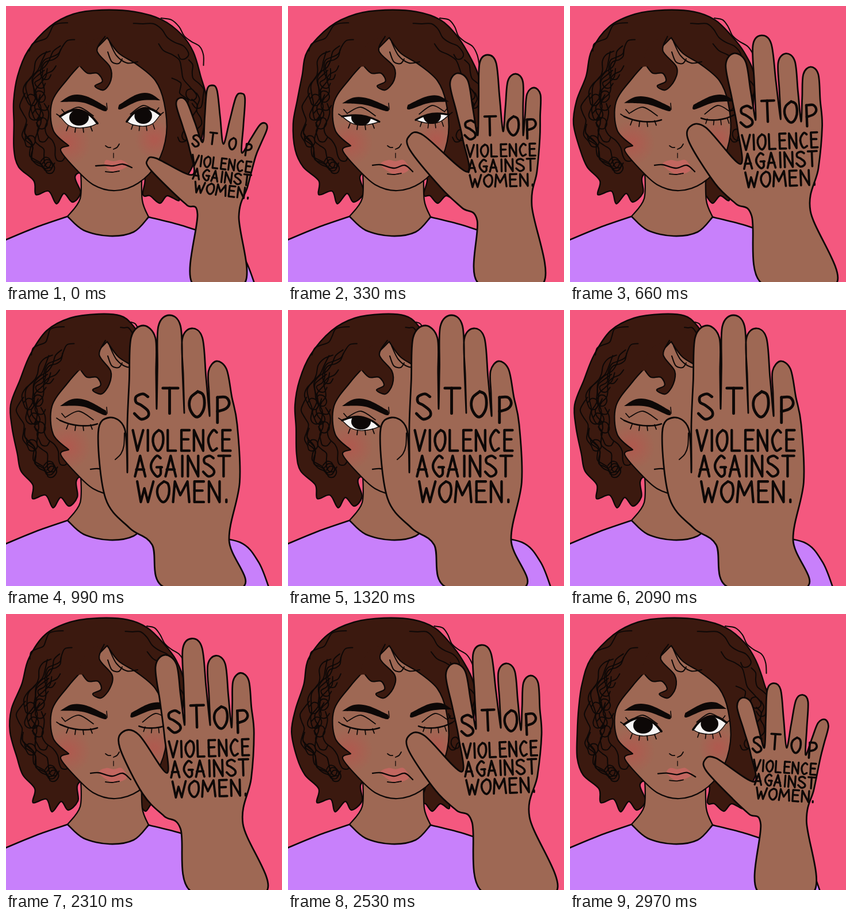
Recreate the animation shown at these times as an HTML page with a canvas. Size 480x480 px, loop 3.08 s.

```html
<!DOCTYPE html>
<html lang="en">
<head>
<meta charset="utf-8">
<title>Stop violence against women.</title>
<style>
  html, body { margin: 0; width: 100%; height: 100%; overflow: hidden; background: #f4587f; }
  canvas { display: block; width: 480px; height: 480px; }
</style>
</head>
<body>
<canvas id="stage" width="480" height="480" role="img" aria-label="STOP VIOLENCE AGAINST WOMEN."></canvas>
<script>
const ctx = document.getElementById('stage').getContext('2d');
const INK = '#0d0807', SKIN = '#9e6854', HAIR = '#3b190f', SHIRT = '#c880fb', PINK = '#f4587f';
const STEP = 110, COUNT = 28, TURN = 14;

const clamp = v => Math.max(0, Math.min(1, v));
const lerp = (a, b, u) => a + (b - a) * u;
const mix = (p, q, u) => p.map((v, i) => lerp(v, q[i], u));
const P = s => s.split(' ').map(v => v.split(',').map(Number));
const noise = n => { const v = Math.sin(n * 127.1) * 43758.5; return v - Math.floor(v); };

// Joints of the hand as it comes closer (near 0..1).
// arm: wrist and arm bottom, left then right; tips: thumb to little finger; base: finger roots.
const poses = [
  { at: 0, near: 0, arm: '333,362 324,482 405,366 415,482',
    tips: '246,268 302,160 358,138 409,152 451,204', base: '319,248 342,237 378,240 410,255 434,262' },
  { at: 3, near: .35, arm: '329,373 331,482 424,347 444,482',
    tips: '211,226 294,117 347,85 396,118 428,142', base: '304,232 330,225 374,218 409,225 438,229' },
  { at: 5, near: .5, arm: '320,362 337,482 420,353 467,482',
    tips: '211,211 288,86 336,54 379,86 422,107', base: '297,216 327,200 370,198 405,202 441,210' },
  { at: 9, near: 1, arm: '254,408 275,482 388,400 412,482',
    tips: '180,187 239,27 284,9 323,32 366,89', base: '211,199 262,172 310,179 354,184 402,199' }
];
const joints = ['arm', 'tips', 'base'];
poses.forEach(p => joints.forEach(k => p[k] = P(p[k])));

const hairLine = P('130,290 128,325 112,341 99,326 84,344 73,322 50,328 50,304 26,280 16,250 10,205 12,165 24,122 38,78 72,36 115,14 165,7 222,10 268,24 302,50 326,80 342,120 347,170 338,245 318,295 292,310 298,338 278,330 264,343 248,330 236,328 236,290');
const faceLine = P('109,243 82,216 80,167 108,126 136,95 176,55 196,82 228,102 260,130 275,168 279,222 263,273 230,308 190,321 152,311 119,281 95,251');
const bangLine = P('122,106 140,66 171,53 160,78 183,106 182,129 168,146 153,139 167,131 160,117 143,117 132,106');

// Pen strokes on a 0..9 grid, "~" marks a rounded stroke.
const glyphs = {
  S: '~815011134486884907', T: '0090 4049', O: '~501205285987948150', P: '1019 ~1060826415',
  V: '004990', I: '4049', L: '101989', E: '80101989 1474', N: '09008980', C: '~815013164988',
  A: '094089 1676', G: '~81501316598885 5595', W: '0029436990', M: '0910468099', '.': '4849'
};
const advance = { I: .3, '.': .3, W: 1.35, M: 1.35 };

function poseAt(j) {
  let i = 0;
  while (i < poses.length - 2 && poses[i + 1].at <= j) i++;
  const a = poses[i], b = poses[i + 1];
  const t = clamp((j - a.at) / (b.at - a.at));
  const u = i === poses.length - 2 ? t * t : t;
  const p = { j, near: lerp(a.near, b.near, u) };
  joints.forEach(k => p[k] = a[k].map((v, n) => mix(v, b[k][n], u)));
  p.open = Math.max(clamp((5 - j) / 3.8), clamp((j - 9) / 4));
  p.sneer = clamp(j / 3);
  p.size = 20 + 24 * p.near ** .6;
  p.bulge = 2 + 36 * p.near ** 2;
  return p;
}

// Smooth line through the points; indices in corners stay sharp.
function curve(p, closed = false, corners = []) {
  const n = p.length;
  const at = i => closed ? p[(i + n) % n] : p[Math.max(0, Math.min(n - 1, i))];
  ctx.beginPath();
  ctx.moveTo(...p[0]);
  for (let i = 0; i < n - (closed ? 0 : 1); i++) {
    const a = at(i), b = at(i + 1);
    const z = corners.includes(i) ? a : at(i - 1);
    const y = corners.includes((i + 1) % n) ? b : at(i + 2);
    ctx.bezierCurveTo(a[0] + (b[0] - z[0]) / 6, a[1] + (b[1] - z[1]) / 6,
      b[0] - (y[0] - a[0]) / 6, b[1] - (y[1] - a[1]) / 6, ...b);
  }
}
function fill(color) { ctx.fillStyle = color; ctx.fill(); }
function stroke(w = 2.3) { ctx.strokeStyle = INK; ctx.lineWidth = w; ctx.stroke(); }
function line(p, w) { curve(typeof p === 'string' ? P(p) : p); stroke(w); }

// Hair waves with time; its right half folds away behind the near hand.
function sway([x, y], p, amp) {
  const fold = 1 - .6 * p.near ** 2;
  return [(x > 190 ? 190 + (x - 190) * fold : x) + Math.sin(y * .04 + p.j * .5) * amp, y];
}

function strand(p, side, r, from, to, loop) {
  const pts = [];
  for (let i = 0; i <= 7; i++) {
    const a = lerp(from, to, i / 7), q = r + Math.sin(i * 1.5 + r) * 5;
    pts.push([188 + side * q * Math.sin(a), 184 - q * Math.cos(a)]);
  }
  const [x, y] = pts[7];
  for (let i = 1; i <= loop; i++) pts.push([x + side * (Math.cos(i) - 1) * 9, y + Math.sin(i) * 10]);
  line(pts.map(v => sway(v, p, 4)), 2);
}

function drawHair(p) {
  curve(hairLine.map(v => sway(v, p, 4)), true);
  fill(HAIR);
  stroke(2.4);
  for (let i = 0; i < 22; i++) {
    const side = i % 3 === 2 ? 1 : -1, from = .15 + noise(i + 3) * 1.7;
    strand(p, side, 122 + noise(i + 40) * 44, from, from + .4 + noise(i + 80) * .4, i % 2 ? 6 : 3);
  }
  strand(p, -1, 181, .5, .95, 0);
  strand(p, 1, 182, .45, 1.1, 0);
}

function drawBody(p) {
  const rx = 432 + 25 * p.near;
  const collar = P('107,366 135,390 180,400 222,393 248,367');
  const left = P('130,285 129,335 107,366'), right = P('248,367 237,338 236,285');
  curve([...left, ...collar.slice(1, 4), ...right], true, [0, 2, 6, 8]);
  fill(SKIN);
  line(left);
  line(right);
  curve([[-6, 409], [52, 385], ...collar, [300, 380], [335, 391], [rx - 50, 404], [rx - 18, 438], [rx, 482]], false, [2, 6]);
  ctx.lineTo(-6, 482);
  fill(SHIRT);
  stroke(2.6);
}

function blush(x, y, r) {
  const g = ctx.createRadialGradient(x, y, 4, x, y, r);
  g.addColorStop(0, 'rgba(196,72,72,.42)');
  g.addColorStop(1, 'rgba(196,72,72,0)');
  ctx.fillStyle = g;
  ctx.fillRect(x - r, y - r, 2 * r, 2 * r);
}

function drawEye({ open }) {
  const top = lerp(201, 181, open), low = lerp(202, 212, open), inner = lerp(198, 204, open);
  const upper = [[94, 192], [110, lerp(198, 183, open)], [127, top], [146, lerp(201, 190, open)], [159, inner]];
  if (open > .05) {
    curve([...upper, [145, low - 2], [125, low], [108, low - 5]], true, [0, 4]);
    fill('#f7f5f4');
    stroke(1.4);
    ctx.save();
    ctx.clip();
    ctx.beginPath();
    ctx.ellipse(127, 194, 17, 14, 0, 0, 7);
    fill(INK);
    ctx.restore();
  }
  line(upper, lerp(2.6, 4, open));
  line([[104, 186], [127, 176], [152, 191]], 1.8);
  for (let i = 0; i < 4; i++) {
    const x = 108 + i * 13, y = low - 3 + Math.sin(i) * 3;
    line([[x, y], [x - 3 + i * 2, y + 8]], 1.8);
  }
  line([[94, 192], [88, 188]], 1.8);
  line([[103, 187], [97, 180]], 1.8);
}

function drawBrow({ sneer, near }) {
  const drop = 6 * sneer * (1 - near);
  curve([[94, 167 + drop * .6], [115, 155 + drop], [140, 157 + drop], [174, 175], [172, 183], [134, 168 + drop]], true, [0, 3]);
  fill(INK);
}

function drawMouth({ sneer }) {
  const rest = P('156,278 172,277 187,278 203,275 219,281'), curl = P('147,277 161,276 184,282 203,277 217,288');
  const m = rest.map((v, i) => mix(v, curl[i], sneer));
  curve([m[1], ...P('174,268 187,270 201,268'), [m[4][0] - 7, m[4][1] - 3], [186, 288 + 5 * sneer]], true);
  fill('#c2665f');
  line(m, 2.3);
  line([[173, 288 + 4 * sneer], [185, 289 + 4 * sneer], [197, 287 + 4 * sneer]], 1.8);
}

function drawFace(p) {
  curve(faceLine, true, [0, 5]);
  fill(SKIN);
  ctx.save();
  ctx.clip();
  blush(108, 238, 40);
  blush(258, 232, 34);
  ctx.restore();
  stroke(2.2);
  line('180,62 192,86 210,99 229,97', 2);
  line('177,80 184,97 196,100 202,92', 2);

  const bang = bangLine.map(([x, y]) => [x + Math.sin(y * .05 + p.j * .5) * 2.5, y]);
  curve(bang, true, [0, 2, 7]);
  fill(HAIR);
  curve(bang.slice(2));
  stroke(2.2);

  for (const side of [1, -1]) {
    ctx.save();
    if (side < 0) {
      ctx.translate(353 + 34 * p.near, -3);
      ctx.scale(-.9, 1);
    }
    drawBrow(p);
    drawEye(p);
    ctx.restore();
  }
  line('175,169 176,180', 1.5);
  line('173,243 178,246 182,246', 1.8);
  line('187,249 193,246 197,240', 1.8);
  line('187,256 187,264', 1.3);
  drawMouth(p);
}

// Three points round a tip of width w that points away from root.
function cap(root, tip, w) {
  const dx = tip[0] - root[0], dy = tip[1] - root[1], len = Math.hypot(dx, dy);
  const d = [dx / len * w * .48, dy / len * w * .48];
  return [
    [tip[0] - d[0] + d[1], tip[1] - d[1] - d[0]],
    tip,
    [tip[0] - d[0] - d[1], tip[1] - d[1] + d[0]]
  ];
}

function thumb({ arm, tips, base, size, bulge }) {
  const wrist = arm[0], tip = tips[0];
  const web = mix(base[0], wrist, .4);
  web[0] -= bulge * .45;
  const out = (p, q, u, k) => {
    const [x, y] = mix(p, q, u), len = Math.hypot(q[0] - p[0], q[1] - p[1]);
    return [x + (q[1] - p[1]) / len * k, y - (q[0] - p[0]) / len * k];
  };
  const round = cap(mix(out(wrist, tip, .5, bulge), web, .5), tip, size * 1.1);
  return [out(wrist, round[0], .2, bulge * .6), out(wrist, round[0], .5, bulge), ...round, web];
}

function handLine(p) {
  const { arm, tips, base, size, bulge } = p;
  const pts = [arm[1], arm[0], ...thumb(p), base[0]], corners = [pts.length - 2];
  for (let i = 0; i < 4; i++) {
    const l = base[i], r = base[i + 1];
    const round = cap(mix(l, r, .5), tips[i + 1], size * (1 - i * .085));
    pts.push(mix(l, round[0], .5), ...round, mix(r, round[2], .5), r);
    if (i < 3) corners.push(pts.length - 1);
  }
  const side = mix(base[4], arm[2], .5);
  pts.push([side[0] + bulge * .3, side[1]], arm[2], arm[3]);
  return [pts, corners];
}

function glyph(ch, x, y, w, h) {
  for (const s of glyphs[ch].split(' ')) {
    const p = s.replace('~', '').match(/../g).map(d => [x + d[0] / 9 * w, y + d[1] / 9 * h]);
    curve(p, false, s[0] === '~' ? [] : p.map((_, i) => i));
    stroke(2.2 + h * .06);
  }
}

function word(text, from, to, h) {
  const wide = c => advance[c] || 1, gap = .32;
  const total = [...text].reduce((s, c) => s + wide(c) + gap, -gap);
  const dx = to[0] - from[0], dy = to[1] - from[1], unit = Math.hypot(dx, dy) / total;
  ctx.save();
  ctx.translate(...from);
  ctx.rotate(Math.atan2(dy, dx));
  let x = 0;
  for (const c of text) {
    glyph(c, x, 0, unit * wide(c), h);
    x += unit * (wide(c) + gap);
  }
  ctx.restore();
}

function drawLetters({ arm, base, size }) {
  const l = base[0], r = base[4];
  const tilt = Math.atan2(r[1] - l[1], r[0] - l[0]);
  [...'STOP'].forEach((c, i) => {
    const [x, y] = mix(base[i], base[i + 1], .5);
    ctx.save();
    ctx.translate(x, y - size * .4);
    ctx.rotate(tilt);
    glyph(c, -size * .3, -size / 2, size * .6, size);
    ctx.restore();
  });
  const pitch = (arm[2][1] - r[1]) * .222;
  ['VIOLENCE', 'AGAINST', 'WOMEN.'].forEach((t, i) => {
    const from = mix(l, r, .05 + i * .02), to = mix(l, r, .95 - i * .015);
    from[1] += 10 + pitch * i;
    to[1] += 10 + pitch * i;
    word(t, from, to, pitch * .8);
  });
}

function drawHand(p) {
  curve(...handLine(p));
  fill(SKIN);
  stroke(2.8);
  if (p.near > .9) line('206,214 205,236 200,250 190,260', 2);
  drawLetters(p);
}

function draw(n) {
  const p = poseAt(n <= TURN ? n : COUNT - n);
  ctx.fillStyle = PINK;
  ctx.fillRect(0, 0, 480, 480);
  ctx.lineCap = ctx.lineJoin = 'round';
  drawHair(p);
  drawBody(p);
  drawFace(p);
  drawHand(p);
}

let shown = 0;
const start = performance.now();
draw(0);
function tick(now) {
  const n = Math.floor(Math.max(0, now - start) / STEP) % COUNT;
  if (n !== shown) draw(shown = n);
  requestAnimationFrame(tick);
}
requestAnimationFrame(tick);
</script>
</body>
</html>
```
